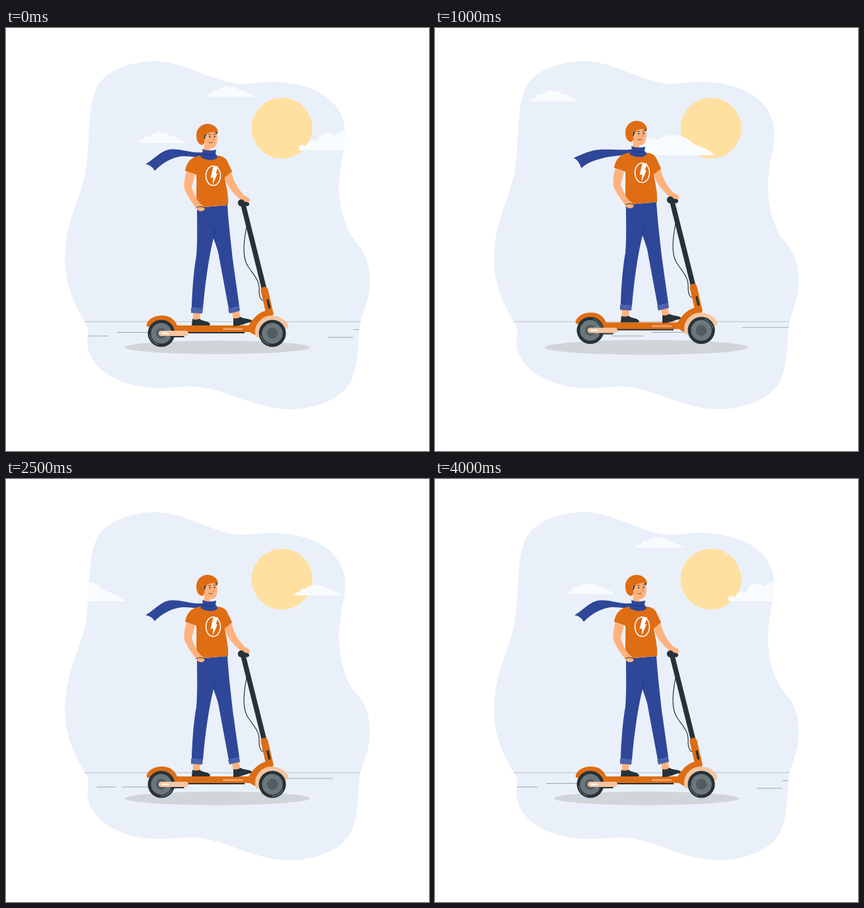
An HTML page that plays this animation: 640x640 px, repeating every 4.07 s.

```html
<!DOCTYPE html>
<html lang="en">
<head>
<meta charset="utf-8">
<title>Scooter ride</title>
<style>
  html, body { margin: 0; width: 100%; height: 100%; overflow: hidden; background: #fff; }
  svg { display: block; width: 100vw; height: 100vh; }
  .orange { fill: #de6d14; }
  .blue { fill: #2e4799; }
  .cuff { fill: #4a61ad; }
  .skin { fill: #ffb27d; }
  .dark { fill: #263238; }
  .peach { fill: #f3c5a2; }
  .cloud { fill: #f9fcff; }
  .line { fill: none; stroke: #263238; stroke-linecap: round; stroke-linejoin: round; }
</style>
</head>
<body>
<svg viewBox="0 0 640 640">
  <defs>
    <clipPath id="blob"><path id="land" d="M226 50C268 50 306 78 350 84C374 86 390 78 425 83C470 88 508 110 513 152C516 180 503 205 504 245C506 285 517 310 533 328C547 344 553 368 550 395C547 420 537 436 535 452C533 475 534 500 526 525C516 560 470 577 427 577C375 576 335 547 290 543C262 541 250 547 215 544C165 539 128 515 123 480C122 468 127 460 122 449C113 434 90 400 89 352C89 285 117 255 122 205C127 160 123 115 140 85C155 62 192 50 226 50Z"/></clipPath>
    <path id="small" d="M0 0C-1-3 4-5 8-5C8-10 14-12 18-9C18-14 23-15 25-13C27-17 34-17 37-14C41-16 47-14 48-10C53-12 58-9 60-6C65-5 69-3 72 0Z"/>
    <path id="big" d="M2 0C-1-3 0-8 5-8C8-8 9-7 11-6C13-14 22-17 29-13C29-25 42-31 55-22C64-34 90-34 105-20C108-17 112-16 115-14C123-12 132-8 140 0Z"/>
    <g id="wheel">
      <circle class="dark" r="20.5"/>
      <circle r="15.7" fill="#6b777b"/>
      <circle r="8.3" fill="#515d62"/>
    </g>
  </defs>

  <g clip-path="url(#blob)">
    <use href="#land" fill="#eaf0f9"/>
    <circle cx="417.5" cy="151.5" r="46" fill="#ffe0a0"/>
    <g id="clouds" class="cloud"></g>
    <path d="M100 444.3H550" stroke="#bac0c6"/>
    <g id="dashes" stroke="#263238" stroke-opacity=".5" stroke-width=".8"></g>
  </g>
  <ellipse id="shadow" rx="140" ry="10.2" fill="#d1d5d9"/>

  <g id="rider">
    <path id="tail" class="blue"/>

    <!-- scooter -->
    <path class="line" stroke-width="1.2" d="M364 301C358 330 358 350 367 362C378 378 384 382 383 400C384 412 388 414 396 413"/>
    <path class="line" stroke-width="7.5" d="M359 268L391 396"/>
    <path d="M391 397L399 432" stroke="#de6d14" stroke-width="11" stroke-linecap="round"/>
    <path class="line" stroke-width="3.4" d="M396 412L398.500 423"/>
    <path class="dark" d="M262 459H361V462H262Z"/>
    <path class="orange" d="M213 448C216 439 226 435 236 435C248 435 255 441 259 450H367C374 439 382 430 395 427L405 431L400 440C388 444 384 455 381 465C376 465 372 462 369 460H245L218 452C213 453 212 450 213 448Z"/>
    <path class="peach" d="M378 467C373 448 388 435 402 435C416 435 427 445 427 451C426 457 421 458 417 455L390 468C385 469 380 469 378 467Z"/>
    <path d="M329.500 455.500H357" stroke="#f0a064" stroke-width="3" stroke-linecap="round"/>
    <g transform="translate(235 462)"><use href="#wheel"/><path class="glint line" d="M-17.500 3A18 18 0 0 0-5 17" style="stroke:#7f8a8f"/></g>
    <g transform="translate(403 462)"><use href="#wheel"/><path class="glint line" d="M-17.500 3A18 18 0 0 0-5 17" style="stroke:#7f8a8f"/></g>
    <path class="line" stroke-width="4" d="M250 466H268"/>
    <path d="M235 462H272" stroke="#f3c5a2" stroke-width="8" stroke-linecap="round"/>
    <path d="M237 462H245" stroke="#fff" stroke-width="2.600" stroke-linecap="round"/>

    <!-- legs -->
    <path class="skin" d="M283 430H294L293 442H283ZM342 430L352 428L355 439L344 441Z"/>
    <path class="dark" d="M282 440C286 442 290 441 293 440C297 444 307 443 309 448L308 450H281ZM344 439C348 440 352 439 355 437C360 441 370 439 372 443L371 445C363 446 356 451 344 451Z"/>
    <path class="blue" d="M289 272L335 268C337 300 341 330 343 350L353 421L337 425L323 350C321 335 317 328 314 318C306 350 301 390 298 425L281 423C282 390 285 360 288 345C290 320 289 300 289 272Z"/>
    <path d="M316.500 303L314 318" stroke="#213578" stroke-width="1"/>
    <path class="cuff" d="M280 423L298 424L297 432L280 431ZM336 425L353 421L354 428L338 432Z"/>

    <!-- torso and arms -->
    <path class="skin" d="M331 224L341 216C344 233 352 244 360 253C364 256 369 256 369 261C368 265 362 265 357 262C346 252 333 240 331 224Z"/>
    <path class="line" stroke-width="6" d="M357 265L365 266.500"/>
    <circle class="dark" cx="356" cy="264.500" r="5.200"/>
    <path class="orange" d="M296 193C302 199 314 200 321 193C328 194 333 197 335 202L342 217L331 226C333 240 337 252 336 268C322 269 306 270 289 272C287 255 289 240 288 222L271 216C273 206 278 194 296 193Z"/>
    <path class="skin" d="M273 217C270 228 268 239 271 246C276 257 283 266 289 274C292 279 300 278 301 273L297 268C290 264 283 249 281 240L286 222Z"/>
    <path class="line" stroke-width="1" d="M288 272C291 269 297 270 301 272.500"/>
    <ellipse cx="313.500" cy="223.500" rx="11" ry="14.800" fill="none" stroke="#fff" stroke-width="1.500"/>
    <path fill="#fff" d="M313.500 210L321 209L317.500 220L320 220L312.500 237L313.500 226L309.500 227Z"/>

    <!-- head -->
    <path class="skin" d="M300 164L303 159L319 157C320 165 320 172 318 177C316 181 312 183 309 181L310 190H299L300 176Z"/>
    <path class="dark" d="M299 168L300 161L304 160C301 163 302 167 299 170ZM316 158L320 157L319.500 161Z"/>
    <path class="orange" d="M321 158C320 149 312 145 305 145C295 145 288 153 288 162C288 171 291 176 297 177C301 175 301 170 299 166C299 163 301 161 304 160C310 157 315 157 321 158Z"/>
    <g class="line" stroke-width=".8">
      <path d="M306 161.500Q308 160 310 161M314.500 160.500L317 160.500"/>
      <path d="M313 164L315 169.500H313" style="stroke:#d77a4a"/>
      <path d="M307 173Q310 175 312.500 173"/>
    </g>
    <g id="eyes" class="dark"><ellipse cx="308.300" cy="164.500" rx="1" ry="1.300"/><ellipse cx="315.700" cy="164" rx=".9" ry="1.300"/></g>
    <path class="blue" d="M297 183C303 186 311 186 318 184L317 191C319 192 320 193 320 196C314 202 303 200 295 196L294 190L298 190Z"/>
    <path d="M298 190C304 193 311 193 317 191" fill="none" stroke="#1f3379" stroke-width=".9"/>
  </g>
</svg>
<script>
const LOOP = 4070, STEPS = 57, TICKS = 100;
const $ = id => document.getElementById(id);
const wrap = x => ((x + 100) % 640 + 640) % 640 - 100;

// Eased lookup in [tick, value, ...] rows; col picks the value.
function ease(keys, n, col = 1) {
  let i = 1;
  while (i < keys.length - 1 && keys[i][0] < n) i++;
  const a = keys[i - 1], b = keys[i];
  const u = Math.min(1, Math.max(0, (n - a[0]) / (b[0] - a[0])));
  return a[col] + (b[col] - a[col]) * u * u * (3 - 2 * u);
}

function add(parent, tag, attrs) {
  const el = document.createElementNS('http://www.w3.org/2000/svg', tag);
  for (const k in attrs) el.setAttribute(k, attrs[k]);
  return parent.appendChild(el);
}

const clouds = [
  { shape: 'small', x: 304, y: [[0, 104], [20, 113], [36, 103], [77, 109], [90, 108], [100, 104]] },
  { shape: 'small', x: 200, y: [[0, 174], [20, 164], [63, 176], [77, 174], [90, 174], [100, 174]] },
  { shape: 'big', x: 443, y: [[0, 185], [20, 194], [36, 188], [63, 185], [90, 188], [100, 185]] }
];
for (const c of clouds) c.el = add($('clouds'), 'use', { href: '#' + c.shape });

// x, y, length
const dashes = [
  [305, 453, 119], [526, 456.5, 43], [168, 460.5, 64],
  [67, 466, 28], [106, 466, 49], [487, 468, 38]
].map(([x, y, len]) => ({ x, y, el: add($('dashes'), 'path', { d: `M0 0h${len}` }) }));

const hop = [[0, 0], [21, 0], [25, 1], [29, 0], [73, 0], [77, 1], [81, 0], [100, 0]];

// tick, tip x, tip y, corner x, corner y, crest y
const sway = [
  [0, 211, 206, 225, 216, 183.5], [20, 209, 200, 221, 216, 189],
  [36, 211, 206, 223, 218, 187], [50, 212, 205, 226, 214, 178],
  [63, 211, 206, 225, 215, 183.5], [77, 211, 202.5, 224, 214, 183],
  [90, 212, 203, 224, 213, 184], [100, 211, 206, 225, 216, 183.5]
];

function tailPath(n) {
  const [tx, ty, cx, cy, top] = [1, 2, 3, 4, 5].map(c => ease(sway, n, c));
  return `M298 188C282 190 266 ${top - 1} 250 ${top}C234 ${top + 1} 223 ${ty - 6} ${tx} ${ty}` +
    `Q${cx - 5} ${ty + 1} ${cx} ${cy}C${cx + 9} ${cy - 9} 246 ${top + 14} 263 ${top + 11}` +
    `C276 ${top + 9} 286 197 298 194Z`;
}

function draw(n) {
  const move = (el, x, y) => el.setAttribute('transform', `translate(${x} ${y})`);
  for (const c of clouds) move(c.el, wrap(c.x - 6.4 * n), ease(c.y, n));
  for (const d of dashes) move(d.el, wrap(d.x - 19.2 * n), d.y);
  const h = ease(hop, n);
  move($('rider'), 0, -4.5 * h);
  $('shadow').setAttribute('transform', `translate(320 483.2) scale(${1 + 0.1 * h})`);
  $('tail').setAttribute('d', tailPath(n));
  for (const g of document.querySelectorAll('.glint')) g.setAttribute('transform', `rotate(${21.6 * n})`);
  const blink = n > 33 && n < 39;
  $('eyes').setAttribute('transform', blink ? 'translate(0 131.400) scale(1 .2)' : '');
}

function frame() {
  const step = Math.floor((performance.now() % LOOP + 5) / LOOP * STEPS);
  draw(Math.ceil(step * TICKS / (STEPS - 1)) % TICKS);
  requestAnimationFrame(frame);
}
frame();
</script>
</body>
</html>
```
